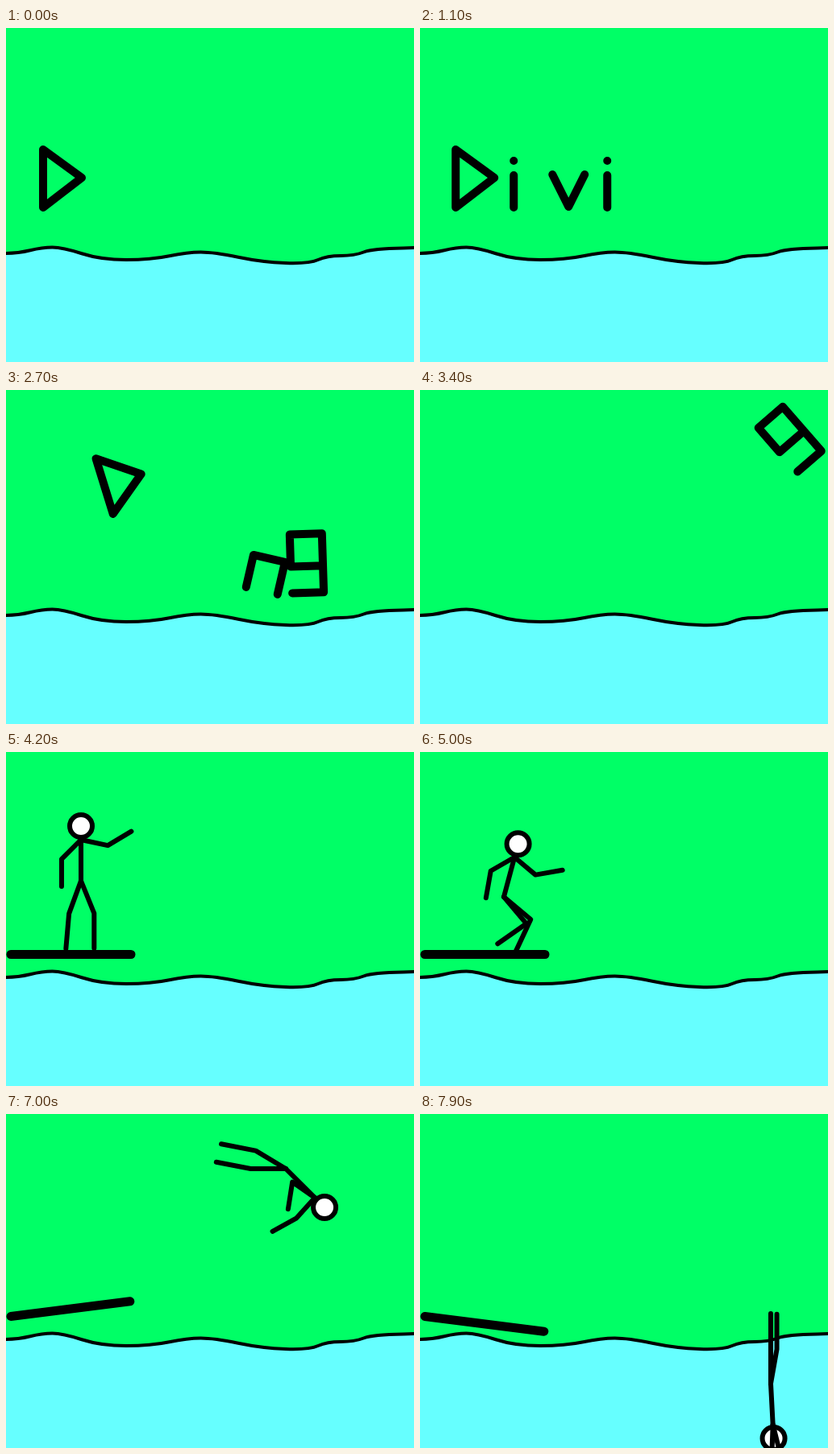
An HTML page with a canvas that plays this animation: 506x415 px, repeating every 8 s.

```html
<!DOCTYPE html>
<html lang="en">
<head>
<meta charset="utf-8">
<title>Diving</title>
<style>
html, body { margin: 0; width: 100%; height: 100%; overflow: hidden; background: #0f6; }
canvas { display: block; }
</style>
</head>
<body>
<canvas id="stage" width="506" height="415"></canvas>
<script>
const ctx = document.getElementById('stage').getContext('2d');
const LOOP = 8000, STEP = 100;
const ARM = 34, LEG = 43.5, TORSO = 51, NECK = 17;

// Control points of the smoothed shoreline
const shore = [[-15, 280], [15, 280], [45, 272.5], [70, 272.5], [118, 288], [180, 288], [225, 278.5],
  [258, 278.5], [318, 291], [376, 293], [398, 283], [432, 283], [455, 274], [530, 273]];

// Each letter rests at x, y, then speeds off in its own direction between start and end
const letter = (path, x, y, dx, dy, turn, end, start = 1800) =>
  ({ path: new Path2D(path), x, y, dx, dy, turn, end, start });
const letterI = 'M0-20V20M0-38h.01';
const word = [
  letter('M-18-36L30-1L-18 36Z', 64, 187, 14.5, -14, -3.3, 3000),
  letter(letterI, 118, 203, -4, 29, 6, 2700),
  letter('M-20-20L0 20L20-20', 186, 202, -7, 35, 0, 2700),
  letter(letterI, 234, 203, 0, 18.5, -8.5, 2700),
  letter('M-20 21V-20H20V21', 283, 203, 7.5, 5, 2.5, 3000),
  letter('M20 3.5H-20V-36.5H20V36.5H-19', 369, 222.5, 20.6, -37, -9.4, 3600, 2600)
];

// Angles: torso, then upper and lower part of arm A, arm B, leg A, leg B
const poses = {
  stand:  [-90, 12, -31, 135, 90, 68, 90, 110, 95],
  land:   [-90, 35, -22, 159, 90, 75, 81, 100, 103],
  crouch: [-75, 40, -10, 150, 100, 40, 115, 50, 145],
  dive:   [45, 132, 151, 215, 99, 211, 191, 180, 191],
  enter:  [87, 92, 92, 76, 76, 270, 270, 280, 270]
};

// Time, hip position, pose
const moves = [
  [3700, 10, 160, 'stand'], [4100, 93, 160, 'stand'], [4600, 93, 160, 'stand'],
  [5000, 104, 180, 'crouch'], [5400, 116, 60, 'stand'], [5800, 134, 172, 'land'],
  [6000, 130, 220, 'crouch'], [6100, 130, 220, 'crouch'],
  [7000, 347, 68, 'dive'], [7900, 435, 335, 'enter']
];

const rad = deg => deg * Math.PI / 180;
const mix = (a, b, p) => a + (b - a) * p;
const walk = ([x, y], deg, len) => [x + len * Math.cos(rad(deg)), y + len * Math.sin(rad(deg))];
// Rises to 1 and falls back to 0 between two times
const pulse = (t, from, to) => t > from && t < to ? Math.sin(Math.PI * (t - from) / (to - from)) : 0;

function line(points, width) {
  ctx.lineWidth = width;
  ctx.beginPath();
  points.forEach(p => ctx.lineTo(...p));
  ctx.stroke();
}

function drawScene() {
  ctx.fillStyle = '#0f6';
  ctx.fillRect(0, 0, 506, 415);
  const curve = new Path2D();
  shore.slice(1).forEach(([x, y], i) => {
    const [px, py] = shore[i];
    curve[i ? 'quadraticCurveTo' : 'moveTo'](...(i ? [px, py] : []), (px + x) / 2, (py + y) / 2);
  });
  curve.lineTo(510, 273);
  const water = new Path2D(curve);
  water.lineTo(510, 420);
  water.lineTo(0, 420);
  ctx.fillStyle = '#6ff';
  ctx.fill(water);
  ctx.lineWidth = 4;
  ctx.stroke(curve);
}

function drawWord(t) {
  const sway = t < 1800 ? -7 * Math.sin(Math.PI * t / 600) ** 2 : 0;
  ctx.lineWidth = 10;
  word.forEach((l, i) => {
    if (t < i * 320 || t >= l.end) return;
    const go = (Math.max(0, t - l.start) / 300) ** 1.5;
    ctx.save();
    ctx.translate(l.x + sway + l.dx * go, l.y + l.dy * go);
    ctx.rotate(rad(l.turn * go));
    ctx.stroke(l.path);
    ctx.restore();
  });
}

function boardAngle(t) {
  if (t <= 6100) return Math.min(16, Math.max(0, (t - 5700) / 20));
  const swing = Math.max(7.2, 16 - (t - 6100) / 100);
  return swing * Math.cos((t - 6100) / 300 * Math.PI);
}

function drawBoard(t) {
  if (t < 3500) return;
  const start = [6 - Math.max(0, 3600 - t) * 0.8, 251.5];
  line([start, walk(start, boardAngle(t), 149)], 11);
}

function diverAt(t) {
  const next = moves.findIndex(m => m[0] > t);
  const b = moves.at(next), a = next < 0 ? b : moves[next - 1];
  const p = a === b ? 1 : (t - a[0]) / (b[0] - a[0]);
  // Rising slows down, falling speeds up
  const lift = b[2] < a[2] ? 1 - (1 - p) ** 2 : p ** 2;
  const angles = poses[a[3]].map((v, i) => mix(v, poses[b[3]][i], p));

  const stride = 40 * pulse(t, 3700, 4100) + 30 * pulse(t, 4600, 5000);
  angles[5] += stride;
  angles[7] -= stride;
  const wave = pulse(t, 4200, 4600) ** 2;
  angles[1] -= 72 * wave;
  angles[2] -= 54 * wave;
  const reach = 110 * pulse(t, 7000, 7900);
  for (let i = 1; i < 5; i++) angles[i] -= reach;

  return { hip: [mix(a[1], b[1], p), mix(a[2], b[2], lift)], angles };
}

function drawDiver(t) {
  if (t < moves[0][0]) return;
  const { hip, angles: [torso, ...limbs] } = diverAt(t);
  const neck = walk(hip, torso, TORSO);
  ctx.lineWidth = 6;
  ctx.beginPath();
  ctx.arc(...walk(neck, torso, NECK), 14, 0, 7);
  ctx.fillStyle = '#fff';
  ctx.fill();
  ctx.stroke();
  line([hip, neck], 6);
  for (let i = 0; i < 8; i += 2) {
    const [root, len] = i < 4 ? [neck, ARM] : [hip, LEG];
    const joint = walk(root, limbs[i], len);
    line([root, joint, walk(joint, limbs[i + 1], len)], 6);
  }
}

function frame(now) {
  const t = Math.floor(now % LOOP / STEP) * STEP;
  ctx.strokeStyle = '#000';
  ctx.lineCap = ctx.lineJoin = 'round';
  drawScene();
  drawWord(t);
  drawBoard(t);
  drawDiver(t);
  requestAnimationFrame(frame);
}
requestAnimationFrame(frame);
</script>
</body>
</html>
```
